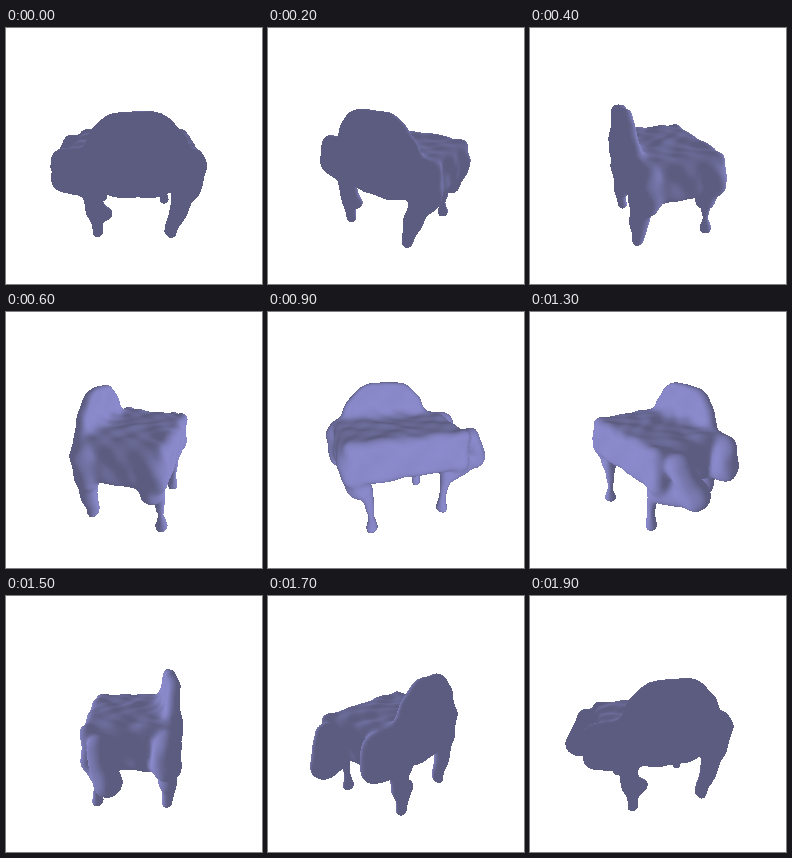
An HTML page with a canvas that plays this animation: 256x256 px, repeating every 2000 ms.

```html
<!DOCTYPE html>
<html>
<head>
<meta charset="utf-8">
<style>
html, body { margin: 0; width: 100%; height: 100%; overflow: hidden; background: #fff; }
canvas { display: block; width: 256px; height: 256px; image-rendering: pixelated; }
</style>
</head>
<body>
<canvas id="stage" width="256" height="256"></canvas>
<script>
const SIZE = 256, CENTER = 128;
const STEPS = 20, STEP_MS = 100;
const CAMERA_DISTANCE = 300, PITCH = 20 * Math.PI / 180;
const LIGHT = [0.08, 0.16, 0.98];
const DARK = [92, 92, 128], GAIN = [46, 46, 76];

// Signed distance model: x is the chair's width, y is up, z points to its front.
const smoothMin = (a, b, k) => {
  const h = Math.max(k - Math.abs(a - b), 0) / k;
  return Math.min(a, b) - h * h * k / 4;
};

function roundBox(x, y, z, hx, hy, hz, r) {
  const qx = Math.abs(x) - hx + r, qy = Math.abs(y) - hy + r, qz = Math.abs(z) - hz + r;
  return Math.hypot(Math.max(qx, 0), Math.max(qy, 0), Math.max(qz, 0)) +
    Math.min(Math.max(qx, qy, qz), 0) - r;
}

function backrest(x, y, z) {
  const panel = roundBox(x - 2, y - 13, 0, 44, 39, 99, 36);
  const qx = panel + 5, qz = Math.abs(z + 35) - 0.5;
  return Math.hypot(Math.max(qx, 0), Math.max(qz, 0)) + Math.min(Math.max(qx, qz), 0) - 5;
}

// Tapered limbs: start point, end point, start radius, end radius.
const limbs = [
  [-67, 4, 28, -79, -21, 20, 10, 10],
  [-79, -21, 20, -48, -26, 31, 10, 10],
  [-64, 5, -27, -66, -13, -25, 11, 11],
  [-62, -14, -28, -40, -21, -30, 11, 9],
  [55, 2, -28, 53, -23, -26, 11, 10],
  [51, -4, 33, 46, -30, 32, 12, 10],
  [-39, -20, -31, -35, -67, -32, 10, 5.5],
  [-35, -46, -32, -26, -47, -32, 7, 6],
  [48, -22, -30, 36, -67, -32, 11, 6],
  [38, -30, 36, 36, -67, 38, 5, 2.5],
  [36, -64, 38, 36, -68, 38, 4, 6],
  [-39, -28, 34, -37, -61, 35, 5, 2.5],
  [-37, -59, 35, -37, -64, 35, 4, 6]
];

function limb(x, y, z, [ax, ay, az, bx, by, bz, r0, r1]) {
  const dx = bx - ax, dy = by - ay, dz = bz - az;
  const along = ((x - ax) * dx + (y - ay) * dy + (z - az) * dz) / (dx * dx + dy * dy + dz * dz);
  const t = Math.min(1, Math.max(0, along));
  return Math.hypot(x - ax - dx * t, y - ay - dy * t, z - az - dz * t) - r0 - (r1 - r0) * t;
}

function distance(x, y, z) {
  let d = roundBox(x, y + 3, z - 4, 60, 20, 41, 8);
  d = smoothMin(d, backrest(x, y, z), 14);
  for (const l of limbs) d = smoothMin(d, limb(x, y, z, l), 6);
  const lumps = Math.sin(x * 0.11 + 2 * Math.sin(z * 0.09)) * Math.sin(y * 0.17 + x * 0.05 + 1) +
    0.6 * Math.sin(z * 0.25 + 2 * Math.sin(x * 0.07)) * Math.sin(x * 0.16 - y * 0.19);
  return d + lumps;
}

// Surface nets: one vertex per crossed cell, one quad per crossed edge.
function buildMesh() {
  const cell = 2.5, low = [-100, -85, -56], dims = [74, 60, 46];
  const stride = [1, dims[0], dims[0] * dims[1]];
  const field = new Float32Array(dims[0] * dims[1] * dims[2]);
  const vertexOf = new Int32Array(field.length);
  const vertices = [], triangles = [];
  const eachPoint = (from, to, visit) => {
    for (let k = from; k < dims[2] - to; k++)
      for (let j = from; j < dims[1] - to; j++)
        for (let i = from; i < dims[0] - to; i++)
          visit(i + j * stride[1] + k * stride[2], [i, j, k]);
  };
  eachPoint(0, 0, (p, at) => {
    field[p] = distance(...at.map((n, a) => low[a] + n * cell));
  });

  eachPoint(0, 1, (p, at) => {
    const sum = [0, 0, 0];
    let count = 0;
    for (let corner = 0; corner < 8; corner++) {
      const bits = [corner & 1, corner >> 1 & 1, corner >> 2];
      const q = p + bits[0] + bits[1] * stride[1] + bits[2] * stride[2];
      for (let a = 0; a < 3; a++) {
        if (bits[a]) continue;
        const v0 = field[q], v1 = field[q + stride[a]];
        if (v0 < 0 === v1 < 0) continue;
        for (let b = 0; b < 3; b++) sum[b] += bits[b];
        sum[a] += v0 / (v0 - v1);
        count++;
      }
    }
    if (!count) return;
    vertexOf[p] = vertices.length;
    const pos = at.map((n, a) => low[a] + (n + sum[a] / count) * cell);
    vertices.push({ pos, light: brightness(...pos) });
  });

  eachPoint(1, 1, p => {
    for (let a = 0; a < 3; a++) {
      if (field[p] < 0 === field[p + stride[a]] < 0) continue;
      const b = stride[(a + 1) % 3], c = stride[(a + 2) % 3];
      const [v0, v1, v2, v3] = [p, p - b, p - b - c, p - c].map(q => vertexOf[q]);
      triangles.push([v0, v1, v2], [v0, v2, v3]);
    }
  });
  return { vertices, triangles };
}

function brightness(x, y, z) {
  const e = 1.5;
  const n = [
    distance(x + e, y, z) - distance(x - e, y, z),
    distance(x, y + e, z) - distance(x, y - e, z),
    distance(x, y, z + e) - distance(x, y, z - e)
  ];
  const dot = n[0] * LIGHT[0] + n[1] * LIGHT[1] + n[2] * LIGHT[2];
  return Math.max(0, dot / Math.hypot(...n));
}

const context = document.getElementById("stage").getContext("2d");
const picture = context.createImageData(SIZE, SIZE);
const depth = new Float32Array(SIZE * SIZE);
const mesh = buildMesh();

function project({ pos: [x, y, z], light }, angle) {
  const c = Math.cos(angle), s = Math.sin(angle);
  const toward = x * s - z * c;
  const near = toward * Math.cos(PITCH) + y * Math.sin(PITCH);
  const scale = CAMERA_DISTANCE / (CAMERA_DISTANCE - near);
  return {
    x: CENTER + scale * (x * c + z * s),
    y: CENTER + scale * (toward * Math.sin(PITCH) - y * Math.cos(PITCH)),
    scale, light
  };
}

function fillTriangle(a, b, c) {
  const area = (b.x - a.x) * (c.y - a.y) - (b.y - a.y) * (c.x - a.x);
  if (!area) return;
  const x0 = Math.max(0, Math.ceil(Math.min(a.x, b.x, c.x) - 0.5));
  const x1 = Math.min(SIZE - 1, Math.floor(Math.max(a.x, b.x, c.x) - 0.5));
  const y0 = Math.max(0, Math.ceil(Math.min(a.y, b.y, c.y) - 0.5));
  const y1 = Math.min(SIZE - 1, Math.floor(Math.max(a.y, b.y, c.y) - 0.5));
  for (let py = y0; py <= y1; py++) {
    for (let px = x0; px <= x1; px++) {
      const x = px + 0.5 - a.x, y = py + 0.5 - a.y;
      const v = (x * (c.y - a.y) - y * (c.x - a.x)) / area;
      const w = (y * (b.x - a.x) - x * (b.y - a.y)) / area;
      const u = 1 - v - w;
      if (u < -1e-6 || v < -1e-6 || w < -1e-6) continue;
      const scale = u * a.scale + v * b.scale + w * c.scale;
      const at = py * SIZE + px;
      if (scale <= depth[at]) continue;
      depth[at] = scale;
      const light = u * a.light + v * b.light + w * c.light;
      for (let i = 0; i < 3; i++) picture.data[at * 4 + i] = DARK[i] + GAIN[i] * light;
    }
  }
}

function draw(step) {
  picture.data.fill(255);
  depth.fill(0);
  const angle = step * 2 * Math.PI / STEPS;
  const points = mesh.vertices.map(v => project(v, angle));
  for (const [a, b, c] of mesh.triangles) fillTriangle(points[a], points[b], points[c]);
  context.putImageData(picture, 0, 0);
}

let shown = -1;
const start = performance.now();
function tick() {
  const step = Math.floor((performance.now() - start) / STEP_MS) % STEPS;
  if (step !== shown) draw(shown = step);
  requestAnimationFrame(tick);
}
tick();
</script>
</body>
</html>
```
